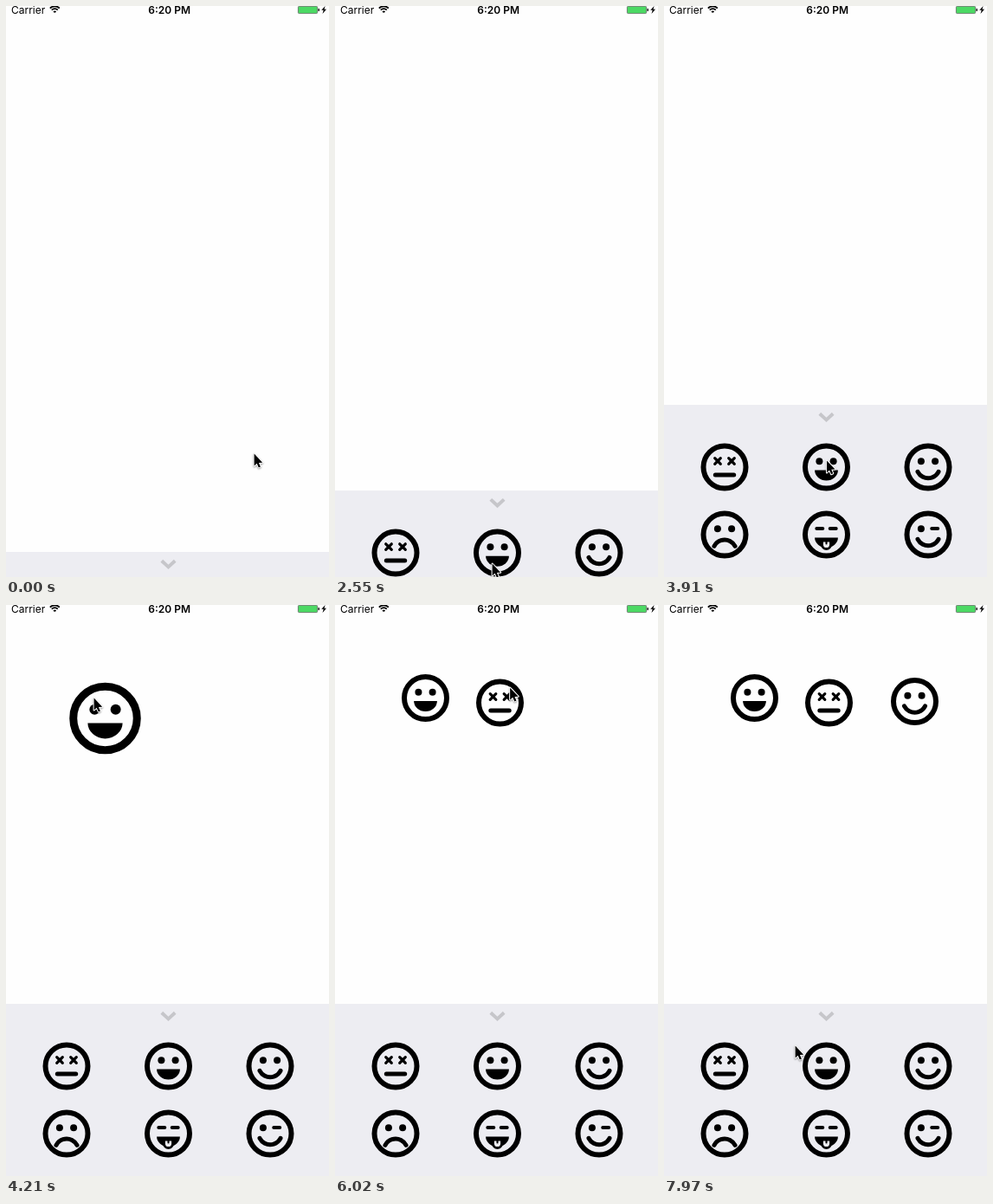
These frames come from a looping animation (373x660 px, 8000 ms). An HTML page with a canvas:

```html
<!DOCTYPE html>
<html lang="en">
<head>
<meta charset="utf-8">
<title>Sticker tray</title>
<style>
  html, body { margin: 0; width: 100%; height: 100%; overflow: hidden; background: #fefefe; }
  canvas { display: block; width: 373px; height: 660px; }
</style>
</head>
<body>
<canvas id="stage"></canvas>
<script>
const W = 373, H = 660, LOOP = 8000;
const BACK = '#fefefe', TRAY = '#ededf2', INK = '#000';
const canvas = document.getElementById('stage');
const ctx = canvas.getContext('2d');
const dpr = window.devicePixelRatio || 1;
canvas.width = W * dpr;
canvas.height = H * dpr;

// Pointer moves: start time, end time, destination. It rests in between.
const origin = [286, 517];
const moves = [
  [40, 840, 213, 640], [880, 1420, 174, 644], [1880, 1950, 181, 644],
  [2950, 3310, 188, 528],
  [3895, 4210, 101, 107], [4210, 4350, 91, 83.5],
  [4390, 4690, 64, 565], [4730, 5250, 69, 516],
  [5405, 5420, 80.5, 513], [5420, 5650, 221, 150], [5650, 5780, 201, 93],
  [6005, 6400, 317.5, 524.5],
  [6450, 6820, 305, 114], [6820, 7140, 302, 103],
  [7545, 7690, 183, 442], [7825, 7970, 151, 509]
];

// Each drag copies a tray face, enlarged until it is dropped
const drags = [
  { face: 'grin', from: 3950, to: 4385, dx: 13.5, dy: 24 },
  { face: 'dead', from: 5430, to: 6005, dx: -10.5, dy: 20 },
  { face: 'smile', from: 6470, to: 7380, dx: -12.5, dy: 8.5 }
];

const ease = u => u * u * (3 - 2 * u);

function pointer(t) {
  let [x, y] = origin;
  for (const [from, to, tx, ty] of moves) {
    if (t <= from) break;
    const s = ease(Math.min(1, (t - from) / (to - from)));
    x += (tx - x) * s;
    y += (ty - y) * s;
  }
  return [x, y];
}

// Critically damped spring
function trayShift(t) {
  const x = Math.max(0, t - 2505) * 0.031;
  return 170 * (1 + x) * Math.exp(-x);
}

function dot(x, y, r) {
  ctx.beginPath();
  ctx.arc(x, y, r, 0, 7);
  ctx.fill();
}

function line(width, ...pts) {
  ctx.lineWidth = width;
  ctx.beginPath();
  pts.forEach(([x, y]) => ctx.lineTo(x, y));
  ctx.stroke();
}

function arc(width, y, r, from = 0, to = 2) {
  ctx.lineWidth = width;
  ctx.beginPath();
  ctx.arc(0, y, r, from * Math.PI, to * Math.PI);
  ctx.stroke();
}

function halfDisc(ry) {
  ctx.beginPath();
  ctx.ellipse(0, 3.6, 13.4, ry, 0, 0, Math.PI);
  ctx.fill();
}

// Rounded pouch hanging below the mouth line
function pouch(half, top, bottom) {
  ctx.beginPath();
  ctx.roundRect(-half, top, half * 2, bottom - top, [0, 0, half, half]);
  ctx.fill();
}

function cross(side) {
  const x = side * 8, y = -7, r = 3.3;
  line(3.2, [x - r, y - r], [x + r, y + r]);
  line(3.2, [x - r, y + r], [x + r, y - r]);
}

const eye = side => dot(side * 8.1, -6.8, 4);
const dash = side => line(4.2, [side * 7.7 - 3.4, -7], [side * 7.7 + 3.4, -7]);
const both = part => { part(-1); part(1); };
const curve = () => arc(5, -0.8, 13.5, 0.15, 0.85);

const faces = {
  dead() { both(cross); line(5, [-10.7, 9], [10.7, 9]); },
  grin() { both(eye); halfDisc(12); },
  smile() { both(eye); curve(); },
  sad() { both(eye); arc(5, 19.5, 13.5, 1.15, 1.85); },
  tongue() {
    both(dash);
    halfDisc(11.5);
    pouch(6.5, 6, 18);
    ctx.fillStyle = TRAY;
    pouch(3.6, 8.5, 15);
    line(2, [0, 8.5], [0, 10.5]);
  },
  wink() { eye(-1); dash(1); curve(); }
};
const names = Object.keys(faces);

function drawFace(name, x, y, scale = 1) {
  ctx.save();
  ctx.translate(x, y);
  ctx.scale(scale, scale);
  ctx.fillStyle = ctx.strokeStyle = INK;
  ctx.lineCap = 'round';
  arc(6, 0, 24.5);
  faces[name]();
  ctx.restore();
}

function label(text, x, weight, align) {
  ctx.font = `${weight} 12px Inter, "Open Sans", sans-serif`;
  ctx.textAlign = align;
  ctx.fillText(text, x, 9);
}

const bolt = new Path2D('M368.6 0L364.3 4.8H366.7L365.5 9L370 3.7H367.5Z');

function drawStatus() {
  ctx.fillStyle = ctx.strokeStyle = INK;
  label('Carrier', 6, 400, 'left');
  label('6:20 PM', 188.7, 600, 'center');

  // Signal fan
  ctx.save();
  ctx.translate(56.3, 8.4);
  ctx.lineCap = 'butt';
  for (const r of [8, 5.1, 1.7]) arc(1.9, 0, r, 1.26, 1.74);
  ctx.restore();

  // Battery and bolt
  ctx.fill(bolt);
  ctx.fillRect(360.5, 3, 1.3, 3);
  ctx.fillStyle = '#4cd964';
  ctx.strokeStyle = '#555';
  ctx.lineWidth = 0.7;
  ctx.beginPath();
  ctx.roundRect(337.4, 0.4, 22.2, 8.2, 1);
  ctx.fill();
  ctx.stroke();
}

function drawTray(shift) {
  ctx.save();
  ctx.translate(0, shift);
  ctx.fillStyle = TRAY;
  ctx.fillRect(0, 461, W, H);
  ctx.strokeStyle = '#c6c6ca';
  ctx.lineCap = 'butt';
  line(4, [179.8, 471.3], [187.5, 478.4], [195.2, 471.3]);
  names.forEach((name, i) =>
    drawFace(name, 70 + (i % 3) * 117.5, 533 + Math.floor(i / 3) * 78));
  ctx.restore();
}

const arrow = new Path2D('M0 0V14L3.1 11.1L5.2 15.8L7.3 14.8L5.3 10.3L9.6 10.1Z');

function drawPointer([x, y]) {
  ctx.save();
  ctx.translate(x + 0.6, y + 0.6);
  ctx.lineJoin = 'round';
  ctx.lineWidth = 2;
  ctx.strokeStyle = '#fff';
  ctx.shadowColor = 'rgba(0,0,0,0.4)';
  ctx.shadowBlur = 2 * dpr;
  ctx.shadowOffsetY = dpr;
  ctx.stroke(arrow);
  ctx.shadowColor = 'transparent';
  ctx.fillStyle = INK;
  ctx.fill(arrow);
  ctx.restore();
}

function draw(t) {
  ctx.setTransform(dpr, 0, 0, dpr, 0, 0);
  ctx.fillStyle = BACK;
  ctx.fillRect(0, 0, W, H);
  drawStatus();
  drawTray(trayShift(t));
  for (const d of drags) {
    if (t < d.from) continue;
    const [x, y] = pointer(Math.min(t, d.to));
    drawFace(d.face, x + d.dx, y + d.dy, t < d.to ? 1.5 : 1);
  }
  drawPointer(pointer(t));
}

const start = performance.now();
function tick() {
  draw((performance.now() - start) % LOOP);
  requestAnimationFrame(tick);
}
tick();
</script>
</body>
</html>
```
